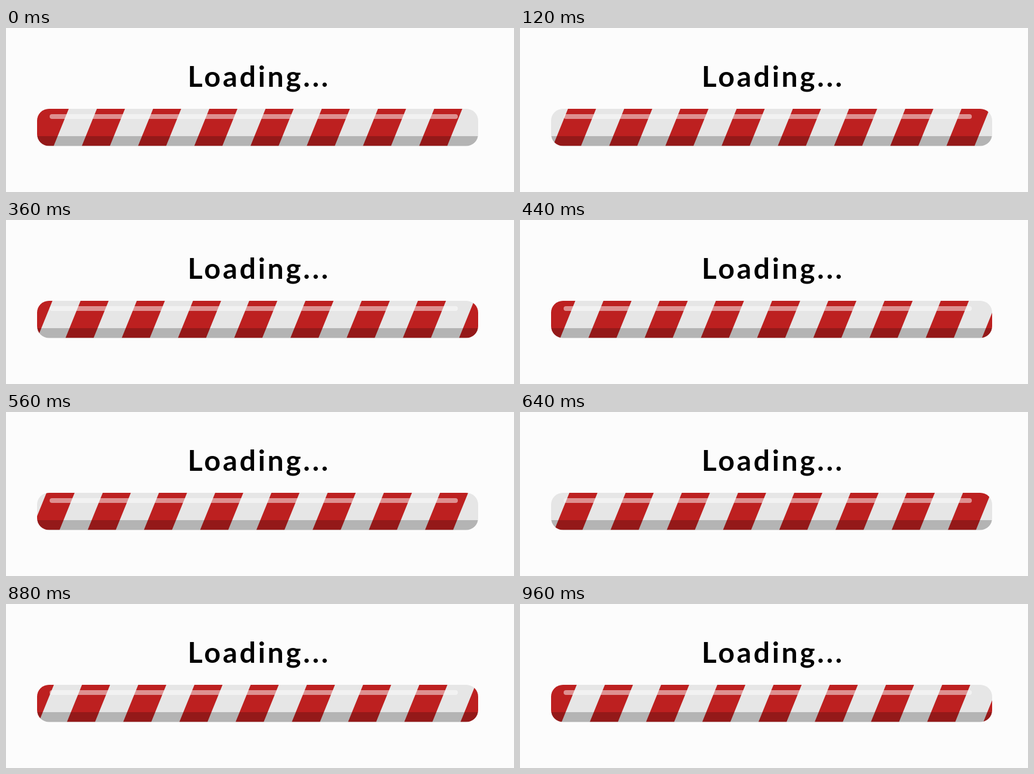
An HTML page that plays this animation: 850x276 px, repeating every 1000 ms.

```html
<!DOCTYPE html>
<html lang="en">
<head>
<meta charset="utf-8">
<title>Loading</title>
<style>
  html, body { margin: 0; width: 100%; height: 100%; overflow: hidden; background: #fcfcfc; }
  svg { display: block; width: 850px; height: 276px; }
  text { font: bold 48px Lato, sans-serif; letter-spacing: 3.7px; }
</style>
</head>
<body>
<svg viewBox="0 0 850 276">
  <clipPath id="bar"><rect x="52" y="136" width="738" height="62.5" rx="20"/></clipPath>
  <text x="304" y="99">Loading...</text>
  <g clip-path="url(#bar)">
    <rect x="52" y="136" width="738" height="63" fill="#e6e6e6"/>
    <path id="stripes" fill="#bd2020"/>
    <rect x="52" y="182" width="738" height="17" fill="#000" fill-opacity=".22"/>
  </g>
  <rect x="73" y="145" width="683" height="8" rx="4" fill="#fff" fill-opacity=".5"/>
</svg>
<script>
  const PERIOD = 94.07, STEP = 7.42, TICK = 40, LOOP = 1000;
  const stripes = document.getElementById('stripes');

  let d = '';
  for (let k = -2; k < 8; k++) {
    d += `M${58 + k * PERIOD} 136h47l-25.2 62.5h-47z`;
  }
  stripes.setAttribute('d', d);

  function draw(now) {
    const tick = Math.floor((now % LOOP) / TICK);
    stripes.setAttribute('transform', `translate(${tick * STEP})`);
    requestAnimationFrame(draw);
  }
  draw(performance.now());
</script>
</body>
</html>
```
